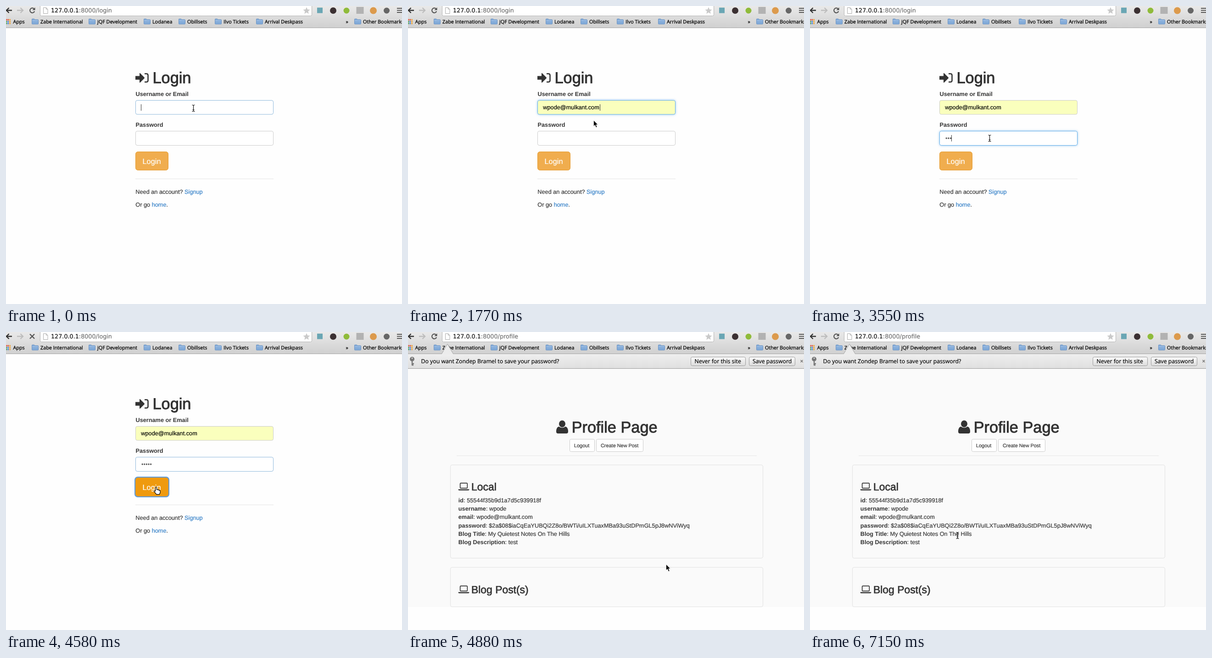
Write an HTML page that moves like this. It is 863 px wide and 649 px high and loops after 8000 ms.

```html
<!DOCTYPE html>
<html lang="en">
<head>
<meta charset="utf-8">
<title>Login demo</title>
<style>
html, body { margin: 0; width: 100%; height: 100%; overflow: hidden; background: #fefefe; }
svg { display: block; }
text { white-space: pre; text-rendering: geometricPrecision; }
text, tspan { fill: currentColor; stroke: currentColor; stroke-width: .2; }
.ui { font: 12.3px "Open Sans", "Noto Sans", sans-serif; color: #000; }
.mark { font-size: 10.8px; stroke-width: .3; }
.url { font: 12.75px "DejaVu Sans", sans-serif; color: #707070; }
.host { color: #111; }
.page { font: 12.73px "Liberation Sans", Arial, sans-serif; color: #333; }
.bold { font-weight: bold; stroke-width: 0; }
.h1 { font-size: 34.3px; stroke-width: 1; }
.h3 { font-size: 22.9px; stroke-width: .7; }
.small { font-size: 10.9px; }
.link { color: #2f7dc6; }
.line { fill: none; stroke: #333; }
.field { fill: #fff; stroke: #ccc; }
.field.edge { stroke: #8fb9dc; }
.field.focus { stroke: #66afe9; filter: drop-shadow(0 0 2.8px rgba(102, 175, 233, .7)); }
.field.filled { fill: #faffbd; }
.well { fill: #fafafa; stroke: #e2e2e2; }
</style>
</head>
<body>
<svg width="863" height="649" viewBox="0 0 863 649">
  <defs>
    <linearGradient id="barFill" x2="0" y2="1"><stop stop-color="#e9e9e9"/><stop offset="1" stop-color="#d0d0d0"/></linearGradient>
    <linearGradient id="infoFill" x2="0" y2="1"><stop stop-color="#efefef"/><stop offset="1" stop-color="#dfdfdf"/></linearGradient>
    <linearGradient id="btnFill" x2="0" y2="1"><stop stop-color="#fafafa"/><stop offset="1" stop-color="#dcdcdc"/></linearGradient>
    <g id="folder">
      <path d="M.5 11V1.5q0-1 1-1h4l1.5 1.7h6.5q1 0 1 1V11q0 1-1 1h-12q-1 0-1-1z" fill="#83abd9" stroke="#6c94c4"/>
      <path d="M1 4.5h13" stroke="#b3cdec"/>
    </g>
    <g id="laptop">
      <rect x="4.2" y="1.2" width="15.6" height="11" rx="1.5" class="line" stroke-width="1.7"/>
      <path d="M0 14.500h24v.5q0 2-2 2H2q-2 0-2-2z" fill="#333"/>
    </g>
  </defs>

  <g id="login">
    <path d="M282 152.5h9V147q0-1.5 1.5-.5l9 9q1 1 0 2l-9 9q-1.5 1-1.5-.5v-5.5h-9z" fill="#333"/>
    <path d="M302 147.5h4q3.5 0 3.5 3.500v11q0 3.500-3.500 3.500h-4" class="line" stroke-width="2.600"/>
    <text class="page h1" x="319.5" y="168">Login</text>
    <text class="page bold" x="282.5" y="196">Username or Email</text>
    <rect id="user" class="field" x="282.5" y="205.5" width="300" height="30.5" rx="3.6"/>
    <text id="userText" class="page" x="294.3" y="225"></text>
    <text class="page bold" x="282.5" y="263">Password</text>
    <rect id="pass" class="field" x="282.5" y="272.5" width="300" height="31" rx="3.6"/>
    <g id="dots" fill="#555"></g>
    <rect id="ring" x="281.5" y="316.5" width="73" height="42" rx="5.5" fill="none" stroke="#5e9bd8" stroke-width="3"/>
    <rect id="button" x="282.5" y="317.5" width="71" height="40" rx="5" stroke="#e59a2c"/>
    <text class="page" x="297.5" y="344" style="font-size:16.4px;color:#fff">Login</text>
    <path d="M282 376.5h301" stroke="#e4e4e4"/>
    <text class="page" x="282.3" y="409">Need an account? <tspan class="link">Signup</tspan></text>
    <text class="page" x="282.3" y="436.5">Or go <tspan class="link">home</tspan>.</text>
    <g id="menu">
      <rect x="282.5" y="236.5" width="300" height="110" fill="#fefefe" stroke="#9cc4ee"/>
      <rect id="hover" x="283" y="238" width="299" height="21.5" fill="#cfe0f7"/>
    </g>
    <path id="caret" stroke="#333"/>
  </g>

  <g id="profile">
    <rect y="48" width="863" height="551" fill="#fafafa"/>
    <ellipse cx="336" cy="200" rx="7" ry="7.5" fill="#333"/>
    <path d="M329 206q7 5 14 0q6 1 6 11q0 4-4 4h-18q-4 0-4-4q0-10 6-11z" fill="#333"/>
    <text class="page h1" x="356.7" y="219">Profile Page</text>
    <rect x="352.5" y="233.5" width="54" height="27" rx="3" fill="#fff" stroke="#ccc"/>
    <text class="page small" x="362" y="251">Logout</text>
    <rect x="410.5" y="233.5" width="102" height="27" rx="3" fill="#fff" stroke="#ccc"/>
    <text class="page small" x="420" y="251">Create New Post</text>
    <path d="M106 269.5h654" stroke="#e6e6e6"/>
    <rect class="well" x="92.5" y="289.5" width="681" height="203" rx="3.6"/>
    <use href="#laptop" x="109.5" y="328"/>
    <text class="page h3" x="138" y="345">Local</text>
    <g id="facts"></g>
    <rect class="well" x="92.5" y="512.5" width="681" height="86" rx="3.6"/>
    <use href="#laptop" x="109.5" y="552"/>
    <text class="page h3" x="138" y="568.5">Blog Post(s)</text>
  </g>

  <rect width="863" height="47" fill="url(#barFill)"/>
  <path d="M0 47.5h863" stroke="#a6a6a6"/>
  <rect x="74.5" y="-6" width="592" height="27.5" rx="3" fill="#fff" stroke="#b4b4b4"/>
  <path d="M13 9.5H2M6.5 4L1 9.5L6.5 15" class="line" stroke="#555" stroke-width="2.4"/>
  <path d="M24 9.5h12M31.5 4L37 9.5L31.5 15" fill="none" stroke="#bdbdbd" stroke-width="2.4"/>
  <g id="reload">
    <path d="M61.5 6.5A5.2 5.2 0 1 0 62.2 11.5" fill="none" stroke="#555" stroke-width="2.2"/>
    <path d="M63.5 3v6h-6z" fill="#555"/>
  </g>
  <path id="stop" d="M52 4.5l10 10m0-10l-10 10" stroke="#555" stroke-width="2.4"/>
  <path d="M81.5 3.5h6l3.5 3.5v9.5h-9.5zM87.5 3.5v3.5h3.5" fill="#fff" stroke="#aaa"/>
  <text class="url" x="98" y="14"><tspan class="host">127.0.0.1</tspan>:8000/<tspan id="route"></tspan></text>
  <path d="M655 2.5l2.2 5 5.3.5-4 3.6 1.2 5.4-4.7-2.9-4.7 2.9 1.2-5.4-4-3.6 5.3-.5z" fill="#c9c9c9"/>
  <rect x="678" y="3.5" width="12" height="12" fill="#6aa6b4"/>
  <circle cx="713" cy="10" r="7" fill="#3b3032"/>
  <circle cx="742" cy="10" r="6.5" fill="#8fbb3a"/>
  <rect x="763.5" y="2" width="16" height="15" fill="#b2b2b2"/>
  <circle cx="800.5" cy="10" r="7.5" fill="#dc9a4c"/>
  <circle cx="829.5" cy="10" r="6.5" fill="#666"/>
  <path d="M852 5h11M852 9.5h11M852 14h11" stroke="#555" stroke-width="2.2"/>
  <g id="apps"></g>
  <text class="ui mark" x="15.5" y="38">Apps</text>
  <text class="ui mark" x="740.5" y="37.5">»</text>
  <g id="marks"></g>

  <g id="infobar">
    <rect y="48" width="863" height="31" fill="url(#infoFill)"/>
    <path d="M0 79.5h863" stroke="#9a9a9a"/>
    <path d="M73 48.5L86 26L99 48.5" fill="#ececec"/>
    <path d="M0 47.5h73.5L86 26L98.5 47.5H863" fill="none" stroke="#a6a6a6"/>
    <circle cx="9" cy="59" r="5" fill="#777"/>
    <path d="M9 62v11M9 69h4M9 72h3" stroke="#777" stroke-width="2.4"/>
    <circle cx="9" cy="57" r="1.3" fill="#eee"/>
    <text class="ui" x="28.5" y="68">Do you want Zondep Bramel to save your password?</text>
    <rect x="616.5" y="54.5" width="119" height="19" rx="3" fill="url(#btnFill)" stroke="#9b9b9b"/>
    <text class="ui" x="624.5" y="68">Never for this site</text>
    <rect x="743.5" y="54.5" width="100" height="19" rx="3" fill="url(#btnFill)" stroke="#9b9b9b"/>
    <text class="ui" x="751" y="68">Save password</text>
    <path d="M855.5 61l5 5m0-5l-5 5" stroke="#777" stroke-width="1.5"/>
  </g>

  <g id="pointer">
    <path id="beam" d="M-3-7Q0-7 0-5Q0-7 3-7M0-5V5M-3 7Q0 7 0 5Q0 7 3 7M-2 3H2" fill="none" stroke="#111" stroke-width="1.2"/>
    <path id="arrow" d="M0 0V13L3 10.2L5.2 15.5L7.6 14.5L5.4 9.4H9.3Z" fill="#000" stroke="#fff" stroke-width=".8"/>
    <path id="hand" d="M-4-7c0-2 3-2 3 0v5c0-1.5 2.6-1.5 2.6 0v.6c0-1.3 2.5-1.3 2.5 0v.8c0-1 2.4-1 2.4.3v4.3l-1.8 3.6h-6.2l-5-6c-1-1.6 1-2.6 2.5-1z" fill="#fff" stroke="#000" stroke-width="1.2"/>
  </g>
</svg>
<script>
const LOOP = 8000;
const EMAIL = 'wpode@mulkant.com';
const $ = id => document.getElementById(id);
const show = (id, on) => { $(id).style.display = on ? '' : 'none'; };
const add = (id, list, draw) => { $(id).innerHTML += list.map(draw).join(''); };

add('marks', [
  [56, 'Zabe International'], [180, 'jQF Development'], [300, 'Lodanea'], [376, 'Obillsets'],
  [455, 'Ilvo Tickets'], [545, 'Arrival Deskpass'], [759, 'Other Bookmarks']
], ([x, name]) => `<use href="#folder" x="${x}" y="27.5"/><text class="ui mark" x="${x + 19}" y="38">${name}</text>`);

add('apps', ['#e0523f', '#e0523f', '#eea63a', '#4ca35a', '#4a86d8', '#eea63a', '#4ca35a', '#4a86d8', '#eea63a'],
  (c, i) => `<rect x="${-1 + i % 3 * 4}" y="${28.5 + Math.floor(i / 3) * 4}" width="3" height="3" fill="${c}"/>`);

add('menu', [EMAIL, 'wpode', 'W', 'WPode5', 'wendril'],
  (s, i) => `<text class="ui" style="font-size:12px" x="285.5" y="${252.5 + i * 21.8}">${s}</text>`);

add('facts', [
  ['id', '55544f35b9d1a7d5c939918f'], ['username', 'wpode'], ['email', EMAIL],
  ['password', '$2a$08$iaCqEaYUBQi2Z8o/BWTi/uILXTuaxMBa93uStDPmGL5pJ8wNViWyq'],
  ['Blog Title', 'My Quietest Notes On The Hills'], ['Blog Description', 'test']
], ([k, v], i) => `<text class="page" x="109.8" y="${371 + i * 18.2}"><tspan class="bold">${k}</tspan>: ${v}</text>`);

add('dots', [0, 1, 2, 3, 4], i => `<circle cx="${297.2 + i * 4.6}" cy="288" r="1.7"/>`);

// start time, shape, x, y
const moves = [
  [0, 'beam', 408.5, 222.5], [1040, 'beam', 408.5, 229], [1180, 'arrow', 404.5, 243],
  [1330, 'arrow', 404.5, 249], [1920, 'arrow', 402, 255], [2060, 'arrow', 397, 267],
  [2210, 'beam', 392.5, 282], [2350, 'beam', 391.5, 288],
  [4150, 'beam', 385.5, 294], [4290, 'arrow', 358, 320], [4440, 'hand', 330, 345],
  [4580, 'hand', 329.5, 346], [4730, 'arrow', 420, 400], [4880, 'arrow', 562.5, 506],
  [5350, 'arrow', 545, 507], [5500, 'arrow', 480, 508], [5650, 'arrow', 400, 505],
  [5800, 'arrow', 335, 490], [5950, 'arrow', 300, 470], [6100, 'beam', 275.5, 448],
  [6250, 'beam', 261.5, 441.5], [7000, 'beam', 290.5, 442], [7150, 'beam', 321.5, 443]
];
const keys = [2950, 3250, 3550, 3700, 4000];

function field(id, focus, edge, filled) {
  $(id).setAttribute('class', 'field' + (focus ? ' focus' : edge ? ' edge' : '') + (filled ? ' filled' : ''));
}

function draw(t) {
  const within = (a, b) => t >= a && t < b;
  const done = t >= 4880;
  show('login', !done);
  show('profile', done);
  show('infobar', done);
  show('reload', !within(4580, 4880));
  show('stop', within(4580, 4880));
  $('route').textContent = done ? 'profile' : 'login';

  const filled = t >= 1180;
  field('user', within(150, 2350), t < 150 || within(2350, 2500), filled);
  field('pass', within(2500, 4580), within(2350, 2500) || within(4580, 4730));
  $('userText').textContent = filled ? EMAIL : t >= 740 ? 'w' : '';
  $('userText').style.color = filled ? '#000' : '#555';
  show('menu', within(740, 1620));
  show('hover', filled);

  const typed = keys.filter(k => t >= k).length;
  [...$('dots').children].forEach((dot, i) => { dot.style.display = i < typed ? '' : 'none'; });

  const inPass = t >= 2350;
  const x = inPass ? 294.9 + typed * 4.6
    : 294.8 + (t >= 740 ? $('userText').getComputedTextLength() + .8 : 0);
  $('caret').setAttribute('d', `M${Math.floor(x) + .5} ${inPass ? 281 : 214}v14`);
  show('caret', t < 450 || within(740, 1180) || within(1620, 4580));

  $('button').setAttribute('fill', t >= 4440 ? '#ef9a0e' : '#f0ad4e');
  show('ring', t >= 4580);

  const [, shape, px, py] = moves.findLast(m => t >= m[0]);
  for (const id of ['beam', 'arrow', 'hand']) show(id, id === shape);
  $('pointer').setAttribute('transform', `translate(${px} ${py})`);
}

function tick() {
  draw(performance.now() % LOOP);
  requestAnimationFrame(tick);
}
tick();
</script>
</body>
</html>
```
